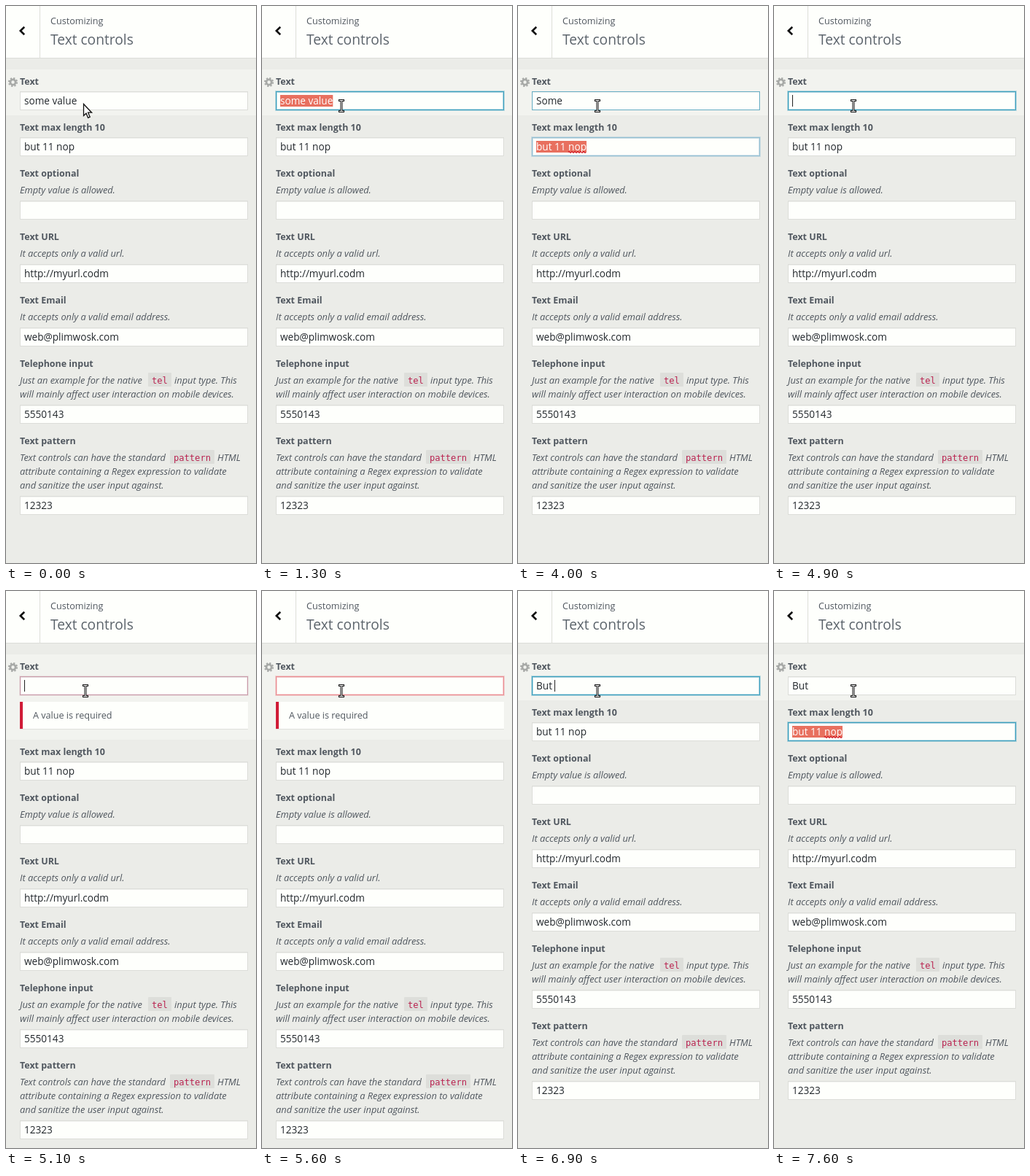
Animation, 343 px wide and 764 px high, one loop 8000 ms. Source, as an HTML page:

```html
<!DOCTYPE html>
<html lang="en">
<head>
<meta charset="utf-8">
<title>Text controls</title>
<style>
html, body { margin: 0; width: 100%; height: 100%; overflow: hidden; background: #ebece8; }
svg { display: block; width: 343px; height: 764px; }
text { font: 13.6px "Open Sans", "Noto Sans", sans-serif; fill: #22272c; white-space: pre; }
.small { font-size: 12.6px; fill: #50575f; }
.title { font-size: 19.2px; fill: #5c646c; }
.label { font-size: 12.45px; font-weight: 700; fill: #50575f; }
.note { font-size: 12.82px; font-style: italic; fill: #50575f; }
.code { font: 12.1px "DejaVu Sans Mono", monospace; fill: #b9224f; }
.glow, .edge { fill: none; }
</style>
</head>
<body>
<svg id="stage" viewBox="0 0 343 764">
  <rect width="343" height="764" fill="#ebece8"/>
  <rect width="343" height="71" fill="#fefffc"/>
  <path d="M0 71.5H343M46.5 0V71" stroke="#dcddd9"/>
  <path d="M25.2 28.8L19.8 34L25.2 39.2" fill="none" stroke="#111" stroke-width="2.6"/>
  <text class="small" x="61" y="25">Customizing</text>
  <text class="title" x="61" y="53">Text controls</text>
  <rect id="row" y="87" width="343" height="63" fill="#f2f3ef"/>
  <g fill="none" stroke="#a7a9a7">
    <circle cx="9.5" cy="104.5" r="3.6" stroke-width="2.8"/>
    <circle cx="9.5" cy="104.5" r="5.6" stroke-width="2" stroke-dasharray="2.2 2.2"/>
  </g>
  <g id="first"></g>
  <g id="error">
    <rect x="19" y="153" width="313" height="37" fill="#000" opacity=".08"/>
    <rect x="19" y="152" width="313" height="37" fill="#fefffc"/>
    <rect x="19" y="152" width="4" height="37" fill="#d01c37"/>
    <text class="small" x="37" y="175">A value is required</text>
  </g>
  <g id="rest"></g>
  <path id="arrow" d="M106.5 134.5V150.5L110 147.2L112.6 153.3L115.2 152.2L112.6 146.2H117.6Z" fill="#fff" stroke="#111" stroke-width="1.3"/>
  <g id="beam" fill="none">
    <path d="M105 129.5H113M109 129.5V144.5M105 144.5H113" stroke="#111" stroke-width="3"/>
    <path d="M106 129.5H112M109 129.5V144.5M106 144.5H112" stroke="#fff"/>
  </g>
</svg>
<script>
const $ = id => document.getElementById(id);

function add(parent, tag, attrs, content = '') {
  const el = document.createElementNS('http://www.w3.org/2000/svg', tag);
  for (const key in attrs) el.setAttribute(key, attrs[key]);
  el.textContent = content;
  return parent.appendChild(el);
}
const write = (parent, kind, x, y, s) => add(parent, 'text', { class: kind, x, y }, s);
const show = (el, on) => el.setAttribute('visibility', on ? 'visible' : 'hidden');

function addField(parent, label, labelY, top, value) {
  write(parent, 'label', 19, labelY, label);
  const box = (kind, grow, more) => add(parent, 'rect', {
    class: kind, x: 19.5 - grow, y: top + .5 - grow, width: 312 + 2 * grow, height: 25 + 2 * grow, ...more
  });
  const fill = box('', 0, { fill: '#fefffc' });
  add(parent, 'path', { d: `M20 ${top + 1.5}H331`, stroke: '#000', opacity: .05 });
  return {
    fill,
    glow: box('glow', 0, { 'stroke-width': 3 }),
    edge: box('edge', 0, { stroke: '#dcddd9' }),
    mark: add(parent, 'rect', { x: 25, y: top + 5, height: 16, width: 0, fill: '#e8705f' }),
    text: write(parent, 'value', 25, top + 18, value),
    caret: add(parent, 'rect', { y: top + 5, width: 1, height: 16, fill: '#222', visibility: 'hidden' })
  };
}

function addCode(x, y, width, s) {
  add($('rest'), 'rect', { x, y: y - 15, width, height: 19, rx: 1, fill: '#dddeda' });
  write($('rest'), 'code', x + 5, y, s);
}

const note = (x, y, s) => write($('rest'), 'note', x, y, s);
const one = addField($('first'), 'Text', 108, 117, 'some value');
const two = addField($('rest'), 'Text max length 10', 171, 180, 'but 11 nop');
const squiggle = add($('rest'), 'path', {
  d: 'M69 200.5' + 'q1 -1.8 2 0t2 0'.repeat(6), fill: 'none', stroke: '#d3222c', 'stroke-width': 1.2
});
addField($('rest'), 'Text optional', 234, 267, '');
note(19, 257, 'Empty value is allowed.');
addField($('rest'), 'Text URL', 321, 354, 'http://myurl.codm');
note(19, 344, 'It accepts only a valid url.');
addField($('rest'), 'Text Email', 408, 441, 'web@plimwosk.com');
note(19, 431, 'It accepts only a valid email address.');
addField($('rest'), 'Telephone input', 495, 547, '5550143');
note(19, 518, 'Just an example for the native');
addCode(195, 518, 32, 'tel');
note(231, 518, 'input type. This');
note(19, 537, 'will mainly affect user interaction on mobile devices.');
addField($('rest'), 'Text pattern', 601, 672, '12323');
note(19, 624, 'Text controls can have the standard');
addCode(225, 624, 61, 'pattern');
note(290, 624, 'HTML');
note(19, 643, 'attribute containing a Regex expression to validate');
note(19, 662, 'and sanitize the user input against.');

// border colour and glow strength
const looks = {
  off: ['#dcddd9', 0],
  fade: ['#66adc3', 0],
  rise: ['#94bfd2', .4],
  on: ['#3c9fbe', .35],
  blush: ['#c99aa8', .2],
  red: ['#ea8c92', .35],
  cool: ['#a38f9c', .15]
};

// start, value, look of field one, look of field two, then flags:
// s = selected, c = caret, e = error shown
const steps = [
  [0, 'some value', 'off', 'off', ''],
  [600, 'some value', 'rise', 'off', 'c'],
  [1000, 'some value', 'on', 'off', 'c'],
  [1300, 'some value', 'on', 'off', 's'],
  [2700, 'S', 'on', 'off', 'c'],
  [3100, 'So', 'on', 'off', 'c'],
  [3400, 'Some', 'on', 'off', 'c'],
  [4000, 'Some', 'fade', 'rise', ''],
  [4100, 'Some', 'off', 'on', ''],
  [4700, 'Some', 'rise', 'off', 's'],
  [4900, '', 'on', 'off', 'c'],
  [5100, '', 'blush', 'off', 'ce'],
  [5500, '', 'red', 'off', 'ce'],
  [5600, '', 'red', 'off', 'e'],
  [6100, 'B', 'cool', 'off', 'c'],
  [6200, 'Bu', 'on', 'off', 'c'],
  [6600, 'But', 'on', 'off', 'c'],
  [6900, 'But ', 'on', 'off', 'c'],
  [7500, 'But ', 'fade', 'rise', ''],
  [7600, 'But ', 'off', 'on', '']
];

function paint(field, look, selected, caret) {
  const [color, strength] = looks[look];
  const width = field.text.textContent ? field.text.getComputedTextLength() : 0;
  field.edge.setAttribute('stroke', color);
  field.glow.setAttribute('stroke', color);
  field.glow.setAttribute('opacity', strength);
  field.mark.setAttribute('width', selected ? width : 0);
  field.text.style.fill = selected ? '#fff' : '';
  field.caret.setAttribute('x', 25 + Math.round(width));
  show(field.caret, caret);
}

function draw(now) {
  const t = now % 8000;
  const [, value, look1, look2, flags] = steps.findLast(step => step[0] <= t);
  const error = flags.includes('e');
  one.text.textContent = value;
  paint(one, look1, flags.includes('s'), flags.includes('c'));
  paint(two, look2, look2 !== 'off', false);
  show(squiggle, look2 !== 'off');
  show($('error'), error);
  $('row').setAttribute('height', error ? 117 : 63);
  $('rest').setAttribute('transform', `translate(0 ${error ? 54 : 0})`);
  show($('arrow'), t < 100);
  show($('beam'), t >= 100);
}

let start;
function tick(now) {
  start ??= now;
  draw(now - start);
  requestAnimationFrame(tick);
}
draw(0);
requestAnimationFrame(tick);
</script>
</body>
</html>
```
